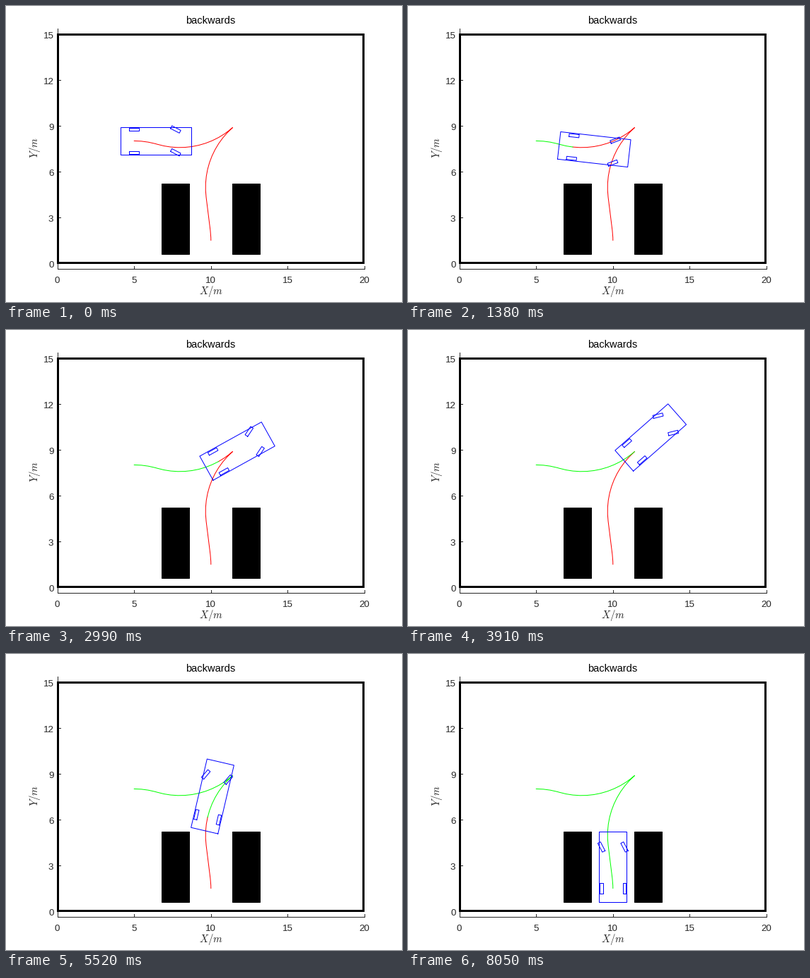
Write a matplotlib script that moves like this. It is 560x420 px and loops after 9.28 s.

```python
import numpy as np
import matplotlib.pyplot as plt
from matplotlib.animation import FuncAnimation
from matplotlib.patches import Rectangle

W, H, DPI = 560, 420, 100
LOOP, TICK, HOLD = 9280, 20, 230
PX = 72 / DPI                        # points per pixel
GREY = "#262626"

# car and course, in metres
RADIUS, STEP = 5.2, 0.46
BASE, REAR, FRONT, HALF = 2.7, 0.9, 3.7, 0.9
TRACK, WHEEL_L, WHEEL_W = 0.75, 0.65, 0.2
STEER = np.arctan(BASE / RADIUS)
START, GOAL = (5, 8, 0), (10, 1.5, np.pi / 2)
FIRST, CUSP = np.radians(16.6), np.radians(41.4)


def to_px(x, y):
    return 72.8 + 21.7 * np.asarray(x), 365 - 21.7 * np.asarray(y)


def advance(pose, turn, gear, dist):
    """Move along an arc (turn 1 left, -1 right) or a straight (turn 0)."""
    x, y, a = pose
    if turn == 0:
        return x + gear * dist * np.cos(a), y + gear * dist * np.sin(a), a
    b = a + turn * gear * dist / RADIUS
    r = turn * RADIUS
    return x + r * (np.sin(b) - np.sin(a)), y - r * (np.cos(b) - np.cos(a)), b


def drive(poses, turn, gear, length):
    """Sample one segment at equal steps, closing with its end point."""
    begin = poses[-1][:3]
    steer = STEER if turn >= 0 else -STEER
    poses[-1] = (*begin, steer)
    marks = [*np.arange(STEP, length - 1e-6, STEP), length]
    poses += [(*advance(begin, turn, gear, d), steer) for d in marks]


def plan():
    poses = [(*START, 0)]
    drive(poses, -1, 1, RADIUS * FIRST)
    drive(poses, 1, 1, RADIUS * (FIRST + CUSP))
    poses.append(poses[-1])          # pause while the wheels swing over
    x, y, a, _ = poses[-1]
    # right arc, straight and left arc in reverse to the goal
    dx = x + RADIUS * np.sin(a) - (GOAL[0] - RADIUS)
    dy = y - RADIUS * np.cos(a) - GOAL[1]
    gap = np.hypot(dx, dy)
    last = np.arctan2(dy, dx) - np.arccos(2 * RADIUS / gap)
    drive(poses, -1, -1, RADIUS * (GOAL[2] + last - a))
    drive(poses, 0, -1, np.sqrt(gap ** 2 - 4 * RADIUS ** 2))
    drive(poses, 1, -1, RADIUS * last)
    return np.array(poses)


def place(pts, x, y, a):
    c, s = np.cos(a), np.sin(a)
    return pts @ np.array([[c, s], [-s, c]]) + (x, y)


def box(x0, x1, y0, y1):
    return np.array([(x0, y0), (x1, y0), (x1, y1), (x0, y1), (x0, y0)])


BODY = box(-REAR, FRONT, -HALF, HALF)
WHEEL = box(-WHEEL_L / 2, WHEEL_L / 2, -WHEEL_W / 2, WHEEL_W / 2)
HUBS = [(0, TRACK), (0, -TRACK), (BASE, TRACK), (BASE, -TRACK)]

poses = plan()
track_x, track_y = to_px(poses[:, 0], poses[:, 1])

plt.rcParams["font.family"] = "Liberation Sans"
plt.rcParams["mathtext.fontset"] = "cm"
fig = plt.figure(figsize=(W / DPI, H / DPI), dpi=DPI, facecolor="white")
ax = fig.add_axes([0, 0, 1, 1])
ax.set_xlim(0, W)
ax.set_ylim(H, 0)
ax.axis("off")


def line(x, y, color, z=2):
    return ax.plot(x, y, color=color, lw=PX, zorder=z)[0]


def label(x, y, text, size, **kw):
    kw = {"color": GREY, "ha": "center", "va": "baseline", **kw}
    ax.text(x, y, text, fontsize=size * PX, **kw)


# axes with ticks
line([73, 73], [32, 373], GREY)
line([73, 506], [373, 373], GREY)
for v in range(0, 21, 5):
    x, _ = to_px(v, 0)
    line([x, x], [369, 373], GREY)
    label(x - 0.3, 393, str(v), 13.33)
for v in range(0, 16, 3):
    _, y = to_px(0, v)
    line([73, 77], [y, y], GREY)
    label(67.5, y + 6, str(v), 13.33, ha="right")
label(289.3, 25, "backwards", 14.67, color="black")
label(289.6, 405, "$X/m$", 14.67, va="center")
label(40.8, 201.2, "$Y/m$", 14.67, va="center", rotation=90)

# walls and parked blocks; strokes snap half a pixel right and down
ax.add_patch(Rectangle((73, 40), 432, 324, fill=False, ec="black",
                       lw=3 * PX, joinstyle="miter", zorder=3))
for left in (6.8, 11.4):
    x, y = to_px(left, 5.2)
    ax.add_patch(Rectangle((x, y), 1.8 * 21.7, 4.6 * 21.7, fc="black",
                           ec="black", lw=PX, zorder=3))

ahead = line([], [], "#ff0000", 4)
done = line([], [], "#00ff00", 5)
car = [line([], [], "#0000ff", 6) for _ in range(5)]


def show(k):
    x, y, a, steer = poses[k]
    ahead.set_data(track_x[k:], track_y[k:])
    done.set_data(track_x[:k + 1], track_y[:k + 1])
    shapes = [BODY]
    for hub in HUBS:
        shapes.append(place(WHEEL, *hub, steer if hub[0] else 0))
    for part, shape in zip(car, shapes):
        part.set_data(*to_px(*place(shape, x, y, a).T))
    return [ahead, done, *car]


def update(i):
    return show(min(int((i + 0.5) * TICK) // HOLD, len(poses) - 1))


def init():
    return show(0)


anim = FuncAnimation(fig, update, frames=LOOP // TICK, init_func=init,
                     interval=TICK, repeat=True, repeat_delay=0, blit=False)
plt.show()
```
